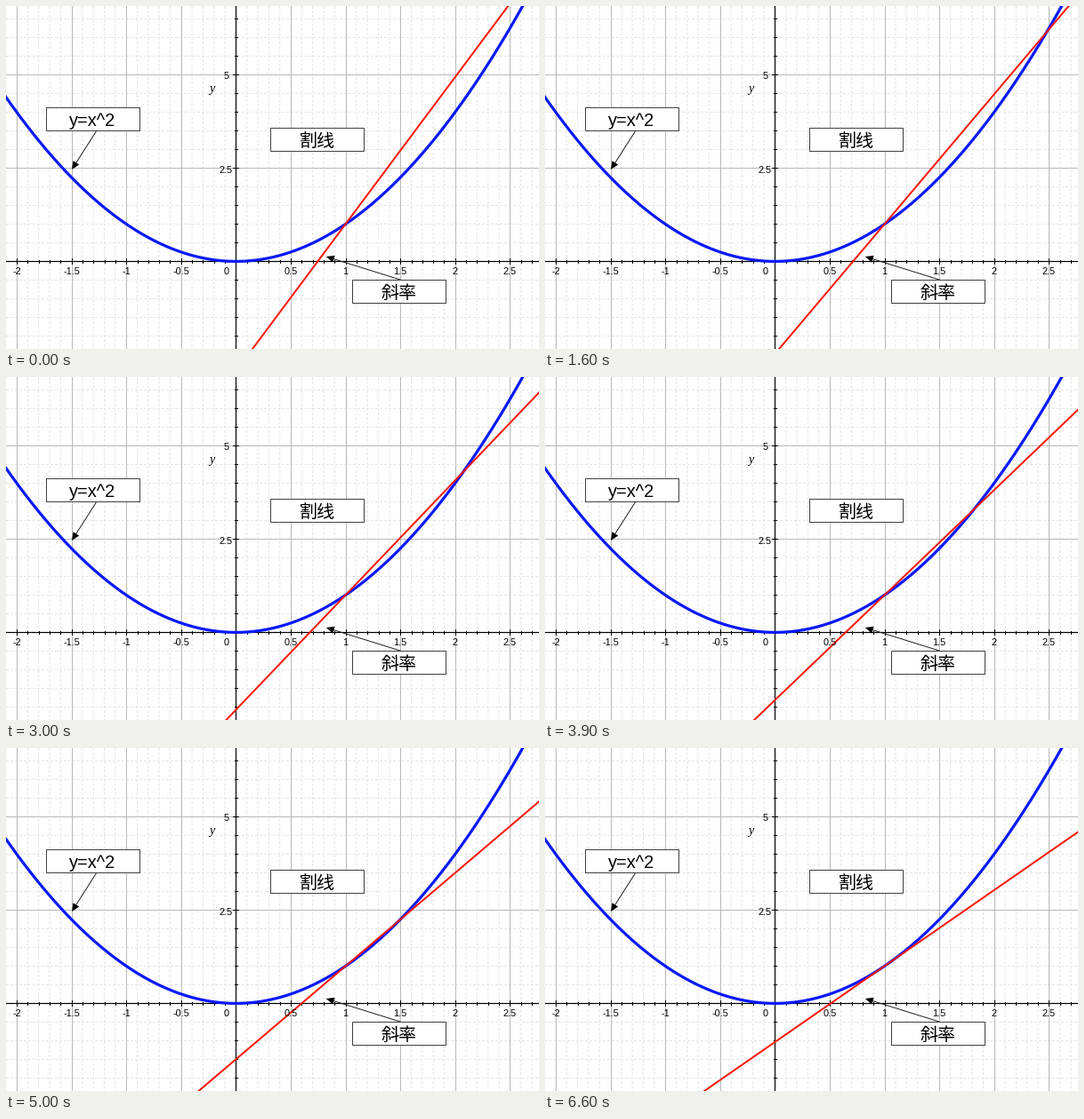
Recreate the animation shown at these times as a matplotlib script. Size 599 by 386 pixels, loop 6.7 s.

```python
import numpy as np
import matplotlib.pyplot as plt
from matplotlib.animation import FuncAnimation
from matplotlib.patches import Polygon, Rectangle

W, H, DPI = 599, 386, 100
PX = 72 / DPI                      # points per pixel
X0, Y0, UX, UY = 258.4, 287.4, 123.2, 42.0
FRAMES, STEP = 67, 100
SLOPE_START, SLOPE_STEP = 3.94, 0.02885

fig = plt.figure(figsize=(W / 100, H / 100), dpi=DPI, facecolor="white")
ax = fig.add_axes([0, 0, 1, 1])
ax.set(xlim=(0, W), ylim=(H, 0))
ax.axis("off")


def sx(x):
    return X0 + UX * x


def sy(y):
    return Y0 - UY * y


def line(xs, ys, color, width, z, **kw):
    return ax.plot(xs, ys, color=color, lw=width * PX, zorder=z, **kw)[0]


def label(x, y, s, size, font, z=5, **kw):
    ax.text(x, y, s, fontsize=size * PX, family=font, zorder=z, color="black", **kw)


def grid_line(xs, ys, major):
    if major:
        line(xs, ys, "#b8b8b8", 1, 1.5)
    else:
        line(xs, ys, "#e4e4e4", 1, 1, dashes=(3, 2), snap=False)


def grid():
    for i in range(-21, 28):
        x = sx(i / 10)
        grid_line([x, x], [0, H], i % 5 == 0)
    for j in range(-4, 14):
        y = sy(j / 2)
        grid_line([0, W], [y, y], j % 5 == 0)


def axes():
    line([0, W], [Y0, Y0], "black", 1.2, 2)
    line([X0, X0], [0, H], "black", 1.2, 2)
    for i in range(-20, 28):
        r = 3 if i % 5 == 0 else 1.5
        line([sx(i / 10)] * 2, [Y0 - r, Y0 + r], "black", 1, 2)
    for j in range(-4, 14):
        r = 3 if j % 5 == 0 else 1.5
        line([X0 - r, X0 + r], [sy(j / 2)] * 2, "black", 1, 2)
    for v in np.arange(-2, 2.6, 0.5):
        if v:
            label(sx(v), 301.5, f"{v:g}", 11, "Liberation Sans", ha="center")
    label(247.5, 301.5, "0", 11, "Liberation Sans", ha="center")
    label(251, 82.5, "5", 11, "Liberation Sans", ha="right")
    label(255, 187.5, "2.5", 11, "Liberation Sans", ha="right")
    label(231, 97, "y", 14, "Liberation Serif", style="italic", ha="center")


def note(x, y, s, font="Noto Sans CJK JP"):
    ax.add_patch(Rectangle((x, y), 105, 26, fc="white", ec="#404040", lw=PX, zorder=6))
    label(x + 52.5, y + 21, s, 20, font, z=7, ha="center")


def arrow(x1, y1, x2, y2, size=9, half=4):
    tip = np.array([x2, y2])
    d = tip - (x1, y1)
    d = d / np.hypot(*d)
    n = np.array([-d[1], d[0]])
    back = tip - size * d
    line([x1, back[0]], [y1, back[1]], "#222222", 1, 5.5)
    ax.add_patch(Polygon([tip, back + half * n, back - half * n], fc="black", lw=0, zorder=6))


grid()
axes()
xs = np.linspace(-2.2, 2.8, 400)
line(sx(xs), sy(xs ** 2), "#0818f8", 3.2, 3)
secant = line([], [], "#f81808", 2, 4, snap=False)

arrow(102, 140, 74, 184)
arrow(443, 308, 359.8, 282)
note(45, 114, "y=x^2", "Liberation Sans")
note(297, 137, "割线")
note(389, 308, "斜率")

ends = np.array([-2.2, 2.9])


def update(k):
    m = SLOPE_START - SLOPE_STEP * k
    secant.set_data(sx(ends), sy(1 + m * (ends - 1)))
    return (secant,)


anim = FuncAnimation(fig, update, frames=FRAMES, interval=STEP, repeat=True, repeat_delay=0)
plt.show()
```
